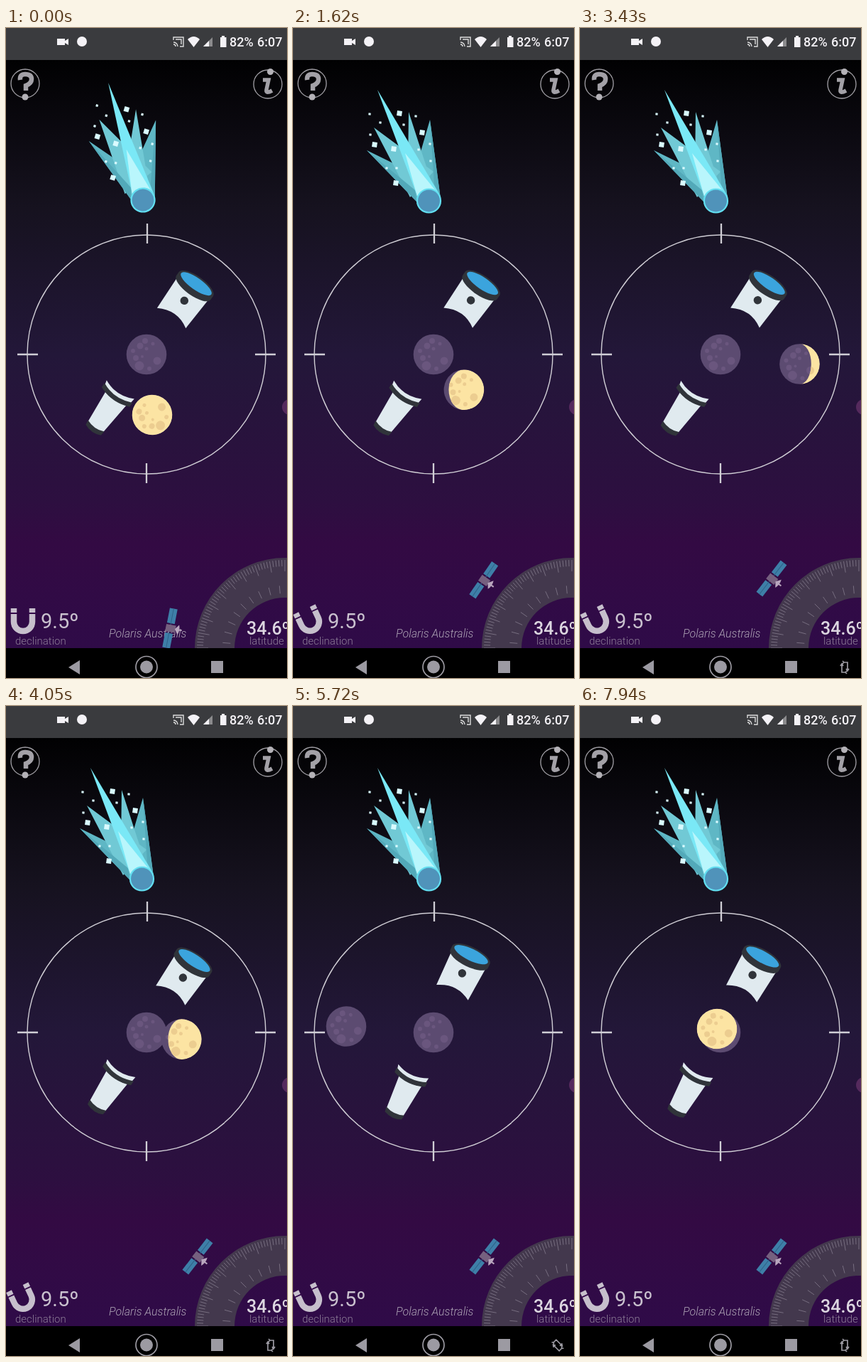
Recreate the animation shown at these times as an HTML page. Size 396 px wide and 914 px high, loop 8 s.

```html
<!DOCTYPE html>
<html lang="en">
<head>
<meta charset="utf-8">
<title>Sky compass</title>
<style>
  html, body { margin: 0; width: 100%; height: 100%; overflow: hidden; background: #000; }
  svg { display: block; width: 100vw; height: 100vh; font-family: Roboto, sans-serif; }
</style>
</head>
<body>
<svg viewBox="0 0 396 914" preserveAspectRatio="none">
  <defs>
    <linearGradient id="sky" x1="0" y1="0" x2="0" y2="1">
      <stop offset="0" stop-color="#010102"/>
      <stop offset=".25" stop-color="#16121f"/>
      <stop offset=".5" stop-color="#231739"/>
      <stop offset=".75" stop-color="#2d0f40"/>
      <stop offset=".82" stop-color="#330a43"/>
      <stop offset="1" stop-color="#2f0b48"/>
    </linearGradient>
    <g id="craters">
      <circle cx="-10" cy="16" r="6.5"/><circle cx="15" cy="9" r="5.5"/>
      <circle cx="-15" cy="5" r="4"/><circle cx="-9" cy="-12" r="4.5"/>
      <circle cx="-2" cy="-19" r="4"/><circle cx="-19" cy="-5" r="3"/>
      <circle cx="0" cy="-8" r="2.5"/><circle cx="9" cy="-15" r="2.5"/>
      <circle cx="4" cy="20" r="3"/><circle cx="-6" cy="3" r="2"/>
    </g>
    <g id="darkMoon">
      <circle r="28.3" fill="#5c4b71"/><use href="#craters" fill="#6a567e"/>
    </g>
    <clipPath id="lit"><path id="litShape"/></clipPath>
  </defs>

  <rect y="45" width="396" height="828" fill="url(#sky)"/>
  <circle cx="400" cy="533" r="11" fill="#552a5d"/>

  <!-- corner buttons -->
  <g fill="none" stroke="#a3a1a7">
    <circle cx="27" cy="78" r="20" stroke-width="1.3"/>
    <path d="M20 73Q19 65 27 65Q36 65 36 72Q36 78 28 81V88" stroke-width="6.5"/>
    <circle cx="369" cy="79" r="20" stroke-width="1.3"/>
    <path d="M362 73H370L367 87Q366 93 375 88" stroke-width="5.5"/>
    <g fill="#b4b2b7" stroke="none"><circle cx="27" cy="97" r="4.5"/><circle cx="372.5" cy="61.5" r="4.5"/></g>
  </g>

  <g id="comet">
    <path fill="#5fb7c5" d="M104 172L174 244L190 214ZM193 129L168 215L208 240Z"/>
    <path fill="#71c9d5" d="M114 140L165 238L198 202ZM163 118L162 195L200 232Z"/>
    <path fill="#53a9b9" d="M104 172L174 244L172 228ZM193 129L199 220L208 240Z"/>
    <path fill="#7ae8f6" d="M119 87L175 236L206 233Z"/>
    <path fill="#b9f6fc" d="M158 176L172 226L176 240L207 236Z"/>
    <g id="sparks" fill="#d9faff"/>
    <circle cx="191.5" cy="243" r="16.5" fill="#5093ba" stroke="#62dff1" stroke-width="2.2"/>
  </g>

  <!-- sight ring -->
  <g fill="none" stroke="#d0ced5">
    <circle cx="198" cy="459" r="168" stroke-width="1.4"/>
    <path d="M199 275V303M198 612V640M16 459H45M351 459H380" stroke-width="2.3"/>
  </g>

  <g id="telescope">
    <path fill="#e0eaef" d="M-27 -114L-25.5 -62Q0 -77 24 -62L27 -114Z"/>
    <path fill="#30343a" d="M-29.5 -121A29.5 11 0 0 1 29.5 -121V-115A29.5 11 0 0 1 -29.5 -115Z"/>
    <ellipse cy="-121.5" rx="26" ry="8.3" fill="#3ba4dd"/>
    <circle cy="-92.5" r="5.7" fill="#30343a"/>
    <path fill="#e0eaef" d="M-25 62Q-2 73 22 61L21 69Q-2 80 -23 70ZM-17 75Q0 82 18 75L13 125Q0 131 -13 125Z"/>
    <path fill="#30343a" d="M-25 67Q-2 78 23 67V74Q-2 84 -25 74ZM-14 123Q0 129 14 123L13 130Q0 136 -13 130Z"/>
  </g>

  <use href="#darkMoon" x="198" y="459"/>
  <g id="moon">
    <g class="face"><use href="#darkMoon"/></g>
    <g clip-path="url(#lit)"><g class="face">
      <circle r="28.3" fill="#fce4a3"/><use href="#craters" fill="#eccd90"/>
    </g></g>
  </g>

  <!-- instruments -->
  <path d="M266 872A127 127 0 0 1 520 872H464A71 71 0 0 0 322 872Z" fill="#43384d"/>
  <path id="ticks" stroke="#7d7486" stroke-width=".9"/>
  <g id="magnet" fill="none" stroke="#c6bfcc" stroke-width="8.5">
    <path d="M-13 -17V2A13 13 0 0 0 13 2V-17"/>
    <path d="M-18 -10H-8M8 -10H18" stroke="#33094a" stroke-width="1.8"/>
  </g>
  <g font-weight="300" fill="#8d7d97" font-size="15">
    <text x="49" y="844" font-size="29" font-weight="400" fill="#c9c1ce">9.5º</text>
    <text x="13" y="867">declination</text>
    <text x="339" y="853" font-size="25" font-weight="500" fill="#dcd6e0">34.6º</text>
    <text x="343" y="867">latitude</text>
    <text x="145" y="857" font-size="16" font-style="italic" fill="#aba0b3">Polaris Australis</text>
  </g>
  <g id="satellite">
    <path fill="#3e7fa8" d="M-5.5 -28h11v21h-11ZM-5.5 7h11v21h-11Z"/>
    <path d="M0 -28V28" stroke="#2f6288"/>
    <path fill="#76607f" d="M-6 -5H8V5H-6Z"/>
    <path fill="#b9a6be" d="M7 0L12 -7Q15 0 12 7ZM12 -1h5v2h-5Z"/>
  </g>

  <!-- status bar -->
  <rect width="396" height="45" fill="#3a3b3e"/>
  <g fill="#f4f2f6">
    <path d="M72 15H83V18L88 15V24L83 21V24H72Z"/>
    <circle cx="107" cy="19" r="7"/>
    <path d="M256 16Q264.5 8 273 16L264.5 27Z"/>
    <path d="M278 26L291 13V26Z" fill="#8b8b8d"/><path d="M278 26L286 18V26Z"/>
    <path d="M304 11H308V13H310.5V27H302V13H304Z"/>
    <path d="M236 17V13H250V26H245M236 20A6 6 0 0 1 242 26M236 23A3 3 0 0 1 239 26M239 16H247V23" fill="none" stroke="#ddd" stroke-width="1.4"/>
    <g font-size="18" font-weight="500"><text x="315" y="26">82%</text><text x="354" y="26">6:07</text></g>
  </g>

  <!-- navigation bar -->
  <rect y="872" width="396" height="42" fill="#000"/>
  <g fill="#9c9aa2">
    <path d="M88 899L104 889V909Z"/>
    <circle cx="198" cy="898.5" r="15" fill="none" stroke="#9c9aa2" stroke-width="1.7"/>
    <circle cx="198" cy="898.5" r="9"/>
    <rect x="289" y="890" width="17" height="17"/>
  </g>
  <g id="turn" fill="none" stroke="#9c9aa2" stroke-width="1.7">
    <path d="M-1 -7H4V4M1 7H-4V-4M-6 -2L-4 -5L-2 -2M2 2L4 5L6 2M-3 -9L-1 -7L-3 -5M3 9L1 7L3 5"/>
  </g>
</svg>
<script>
const LOOP = 8000, STEP = 203.6, R = 28.5;
const $ = id => document.getElementById(id);
const place = (id, x, y, turn) => $(id).setAttribute('transform', `translate(${x} ${y}) rotate(${turn})`);

// Poses at the main steps, joined by a smooth curve.
const steps = [0, 4, 12, 17, 24, 28, 39];
const poses = {
  x: [206, 206.5, 279, 309.5, 140.5, 75, 193],
  y: [544, 535, 483, 472.5, 463, 450.5, 454],
  phase: [0, 0, 87, 125, -86, -180, 0],
  face: [-70, 0, 0, 0, -15, -10, -10],
  heading: [35.2, 35.2, 34.2, 34.5, 31.6, 25.9, 29.2]
};

function pose(name, step) {
  const v = poses[name], last = steps.length - 1;
  let i = 0;
  while (i < last - 1 && step >= steps[i + 1]) i++;
  const span = steps[i + 1] - steps[i], u = (step - steps[i]) / span;
  const slope = k => {
    const a = Math.max(k - 1, 0), b = Math.min(k + 1, last);
    return (v[b] - v[a]) / (steps[b] - steps[a]) * span;
  };
  const u2 = u * u, u3 = u2 * u;
  return v[i] * (2 * u3 - 3 * u2 + 1) + slope(i) * (u3 - 2 * u2 + u)
    + v[i + 1] * (3 * u2 - 2 * u3) + slope(i + 1) * (u3 - u2);
}

function litPath(phase) {
  const c = Math.cos(Math.max(-180, Math.min(180, phase)) * Math.PI / 180);
  const side = phase >= 0 ? 1 : 0, back = c > 0 ? side : 1 - side;
  return `M0 ${-R}A${R} ${R} 0 0 ${side} 0 ${R}A${R * Math.abs(c)} ${R} 0 0 ${back} 0 ${-R}Z`;
}

function drawTicks() {
  let d = '';
  const tick = (deg, from, to) => {
    const a = deg * Math.PI / 180, at = r => `${393 - r * Math.cos(a)} ${872 - r * Math.sin(a)}`;
    d += `M${at(from)}L${at(to)}`;
  };
  for (let deg = 0; deg < 95; deg += 2) tick(deg, 124, deg % 10 ? 115 : 108);
  for (let deg = 5; deg < 95; deg += 10) tick(deg, 77, 88);
  $('ticks').setAttribute('d', d);
}

function drawSparks() {
  const square = size => ([x, y]) =>
    `<rect x="${x - size / 2}" y="${y - size / 2}" width="${size}" height="${size}" transform="rotate(8 ${x} ${y})"/>`;
  const big = [[150, 120], [182, 147], [142, 170], [115, 164], [145, 218]];
  const small = [[108, 121], [123, 133], [109, 150], [173, 124], [156, 136],
    [193, 163], [177, 171], [194, 187], [132, 197], [146, 197]];
  $('sparks').innerHTML = big.map(square(7)).join('') + small.map(square(3.2)).join('');
}

function draw(time) {
  const step = Math.floor((time % LOOP + 35) / STEP);
  const settle = Math.exp(-step), drift = Math.exp(-.43 * step);

  $('comet').setAttribute('transform',
    `translate(${1.5 * settle} ${-settle}) rotate(${8.4 * settle} 191.5 243)`);
  place('magnet', 23 + settle, 833, -25 * (1 - settle));
  place('satellite', 270 - 39 * drift, 774 + 70 * drift, 38 - 27 * drift ** .6);

  place('telescope', 198, 459, pose('heading', step));
  place('moon', pose('x', step), pose('y', step), 0);
  const face = `rotate(${pose('face', step)})`;
  document.querySelectorAll('.face').forEach(g => g.setAttribute('transform', face));
  $('litShape').setAttribute('d', litPath(pose('phase', step)));

  const shown = step >= 27 || (step >= 16 && step < 24);
  $('turn').setAttribute('opacity', shown ? 1 : step === 24 ? .12 : 0);
  place('turn', 373, 899, step === 28 ? -45 : 0);
}

function tick() {
  draw(performance.now());
  requestAnimationFrame(tick);
}

drawTicks();
drawSparks();
tick();
</script>
</body>
</html>
```
